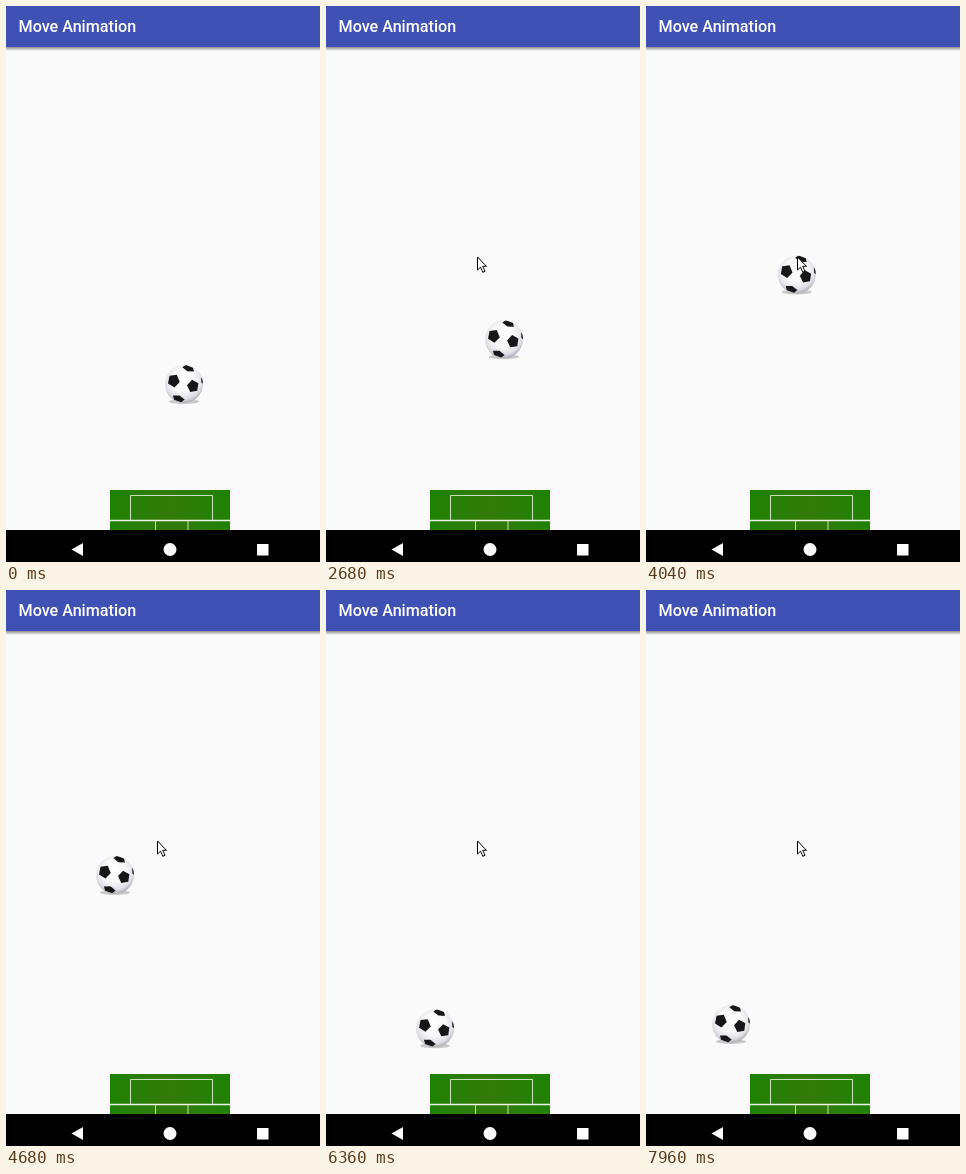
An HTML page that plays this animation: 314x556 px, repeating every 8 s.

```html
<!DOCTYPE html>
<html lang="en">
<head>
<meta charset="utf-8">
<title>Move Animation</title>
<style>
  html, body { margin: 0; width: 100%; height: 100%; overflow: hidden; background: #fafafa; }
  svg { display: block; width: 100%; height: 100%; }
  text { font: 500 16.15px Roboto, sans-serif; fill: #fff; }
</style>
</head>
<body>
<svg viewBox="0 0 314 556">
  <defs>
    <linearGradient id="drop" x2="0" y2="1">
      <stop offset="0" stop-color="#444" stop-opacity=".6"/>
      <stop offset="1" stop-color="#444" stop-opacity="0"/>
    </linearGradient>
    <linearGradient id="grass">
      <stop offset="0" stop-color="#1f8205"/>
      <stop offset=".5" stop-color="#337a08"/>
      <stop offset="1" stop-color="#1f8205"/>
    </linearGradient>
    <radialGradient id="skin" cx=".48" cy=".4" r=".62">
      <stop offset="0" stop-color="#fff"/>
      <stop offset=".5" stop-color="#f8f8fa"/>
      <stop offset=".8" stop-color="#dedee6"/>
      <stop offset="1" stop-color="#a2a2ac"/>
    </radialGradient>
    <clipPath id="round"><circle r="19"/></clipPath>
  </defs>

  <rect width="314" height="556" fill="#fafafa"/>
  <rect y="41" width="314" height="4" fill="url(#drop)"/>
  <rect width="314" height="41" fill="#3f51b5"/>
  <text x="12.5" y="25.5">Move Animation</text>

  <g id="field">
    <rect x="104" y="484" width="120" height="41" fill="url(#grass)"/>
    <path d="M124.500 514V489.500H206.500V514M149.500 514V525M182 514V525"
      fill="none" stroke="#cfe0b8"/>
    <path d="M104 514.500H224" stroke="#eef4e4" stroke-width="1.500"/>
  </g>

  <g id="ball">
    <ellipse cy="17.500" rx="15" ry="2.500" fill="#aaa" opacity=".6"/>
    <circle r="19" fill="url(#skin)"/>
    <g id="patches" clip-path="url(#round)" fill="#17171a"></g>
  </g>

  <rect y="524" width="314" height="32"/>
  <g fill="#fff">
    <path d="M65.500 543.500L77 537V550Z"/>
    <circle cx="164" cy="543.500" r="6.500"/>
    <rect x="251" y="538" width="11.500" height="11.500"/>
  </g>

  <path id="cursor" d="M.5 .5V13.500L3.500 10.700L5.800 15.800L8 14.800L5.700 9.800H9.500Z"
    fill="#fff" stroke="#000" stroke-linejoin="round"/>
</svg>
<script>
  const LOOP = 8000, STEP = 40;
  const $ = id => document.getElementById(id);

  // A five-sided patch, flattened towards the rim of the ball
  function patch(x, y, rx, ry, turn) {
    const points = Array.from({ length: 5 }, (_, i) => {
      const a = turn + i * Math.PI * 2 / 5;
      return `${(x + rx * Math.cos(a)).toFixed(2)},${(y + ry * Math.sin(a)).toFixed(2)}`;
    });
    return `<polygon points="${points.join(' ')}"/>`;
  }
  $('patches').innerHTML =
    patch(-10.3, -3.3, 6.2, 6.8, 0.2) +
    patch(9, 2.2, 6, 6.5, 3.3) +
    `<g transform="rotate(20 4.5 -15.5)">${patch(4.5, -15.5, 6.5, 3, 1.6)}</g>` +
    `<g transform="rotate(20 -5.5 14.5)">${patch(-5.5, 14.5, 6.5, 3.2, -1.6)}</g>` +
    patch(18.5, -4, 1.5, 4, 0);

  const home = { x: 178, y: 378 };
  const moves = [
    { at: 1280, time: 640, dy: -36 },
    { at: 2080, time: 1660, dy: -73.5, power: 2.1 },
    { at: 3740, time: 760, dx: -69 },
    { at: 4500, time: 1900, dy: 173.5 },
    { at: 6400, time: 260, dx: -24 },
    { at: 6660, time: 380, dy: 33 },
    { at: 7040, time: 680, dy: -40 },
    { at: 7920, time: 80, dy: -2 }
  ];

  const progress = (t, from, time) => Math.min(1, Math.max(0, (t - from) / time));

  function place(el, x, y) {
    el.setAttribute('transform', `translate(${x.toFixed(2)} ${y.toFixed(2)})`);
  }

  function draw(now) {
    const t = Math.floor((now % LOOP) / STEP) * STEP;
    let { x, y } = home;
    for (const { at, time, dx = 0, dy = 0, power = 1 } of moves) {
      const p = progress(t, at, time) ** power;
      x += dx * p;
      y += dy * p;
    }
    place($('ball'), x, y);

    // The pointer glides in from the lower right and settles
    const left = (1 - progress(t, 0, 800)) ** 1.5;
    place($('cursor'), 151 + 169 * left, 250.5 + 258 * left);
  }

  const start = performance.now();
  function tick() {
    draw(performance.now() - start);
    requestAnimationFrame(tick);
  }
  tick();
</script>
</body>
</html>
```
